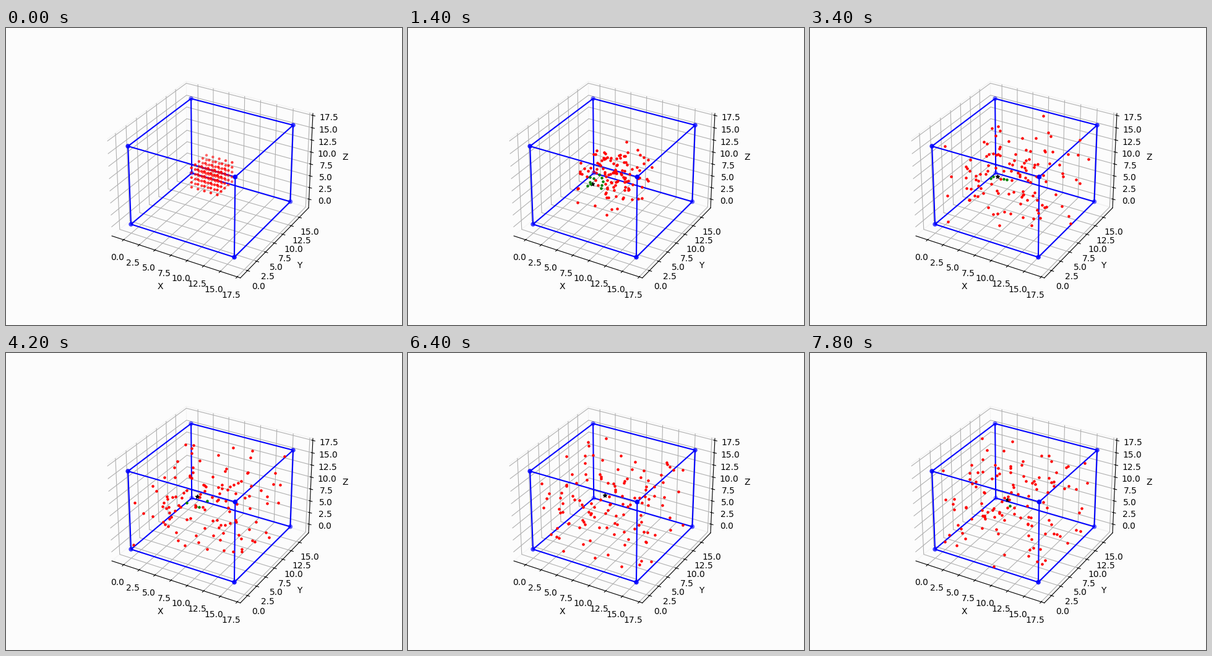
A matplotlib script that plays this animation: 640x480 px, repeating every 8000 ms.

```python
import itertools

import matplotlib.pyplot as plt
import numpy as np
from matplotlib.animation import FuncAnimation

SIDE = 16
MID = SIDE / 2
FRAMES = 40
SPREAD = 0.25
REACH = 2.0
PAPER = "#fcfcfc"

rng = np.random.default_rng(5)
start = np.array(list(itertools.product(range(6, 11), repeat=3)), float)
speed = rng.normal(0, SPREAD, start.shape)

# the tracked particle rises along the left side, then sinks again
TURNS = np.linspace(0, FRAMES - 1, 4)
PATH = MID + np.array([(-2, -2, -2), (-2.3, -2, -0.8),
                       (-0.9, -1.1, 2.2), (-0.7, -1.1, 0.5)])


def positions(i):
    """Straight flight with mirror bounces off the walls."""
    pts = SIDE - np.abs((start + speed * i) % (2 * SIDE) - SIDE)
    pts[0] = [np.interp(i, TURNS, axis) for axis in PATH.T]
    return pts


fig = plt.figure(figsize=(6.4, 4.8), dpi=100, facecolor=PAPER)
ax = fig.add_subplot(projection="3d", facecolor=PAPER)

corners = np.array(list(itertools.product((0, SIDE), repeat=3)))
for a, b in itertools.combinations(corners, 2):
    if np.count_nonzero(a != b) == 1:
        ax.plot(*zip(a, b), color="b")
ax.scatter(*corners.T, color="b")

ax.set(xlabel="X", ylabel="Y", zlabel="Z",
       xlim=(-1.9, 17.96), ylim=(-1.9, 17.9), zlim=(-1.9, 17.9))
ax.set_autoscale_on(False)
for axis, last in ((ax.xaxis, 17.5), (ax.yaxis, 15), (ax.zaxis, 17.5)):
    axis.set_ticks(np.arange(0, last + 1, 2.5))
    axis.pane.set_facecolor(PAPER)
    axis.pane.set_edgecolor("#ececec")

drawn = []


def dots(pts, color, marker=".", shade=False):
    if len(pts):
        drawn.append(ax.scatter(*pts.T, color=color, marker=marker,
                                depthshade=shade))


def reset():
    while drawn:
        drawn.pop().remove()


def update(i):
    reset()
    pts = positions(i)
    if i == 0:
        dots(pts, "r", shade=True)
        return drawn
    star, rest = pts[:1], pts[1:]
    near = np.linalg.norm(rest - star, axis=1) < REACH
    dots(rest[~near], "r")
    dots(rest[near], "g")
    dots(star, "k", "*")
    return drawn


anim = FuncAnimation(fig, update, frames=FRAMES, interval=200,
                     init_func=reset, repeat=True, repeat_delay=0)
plt.show()
```
